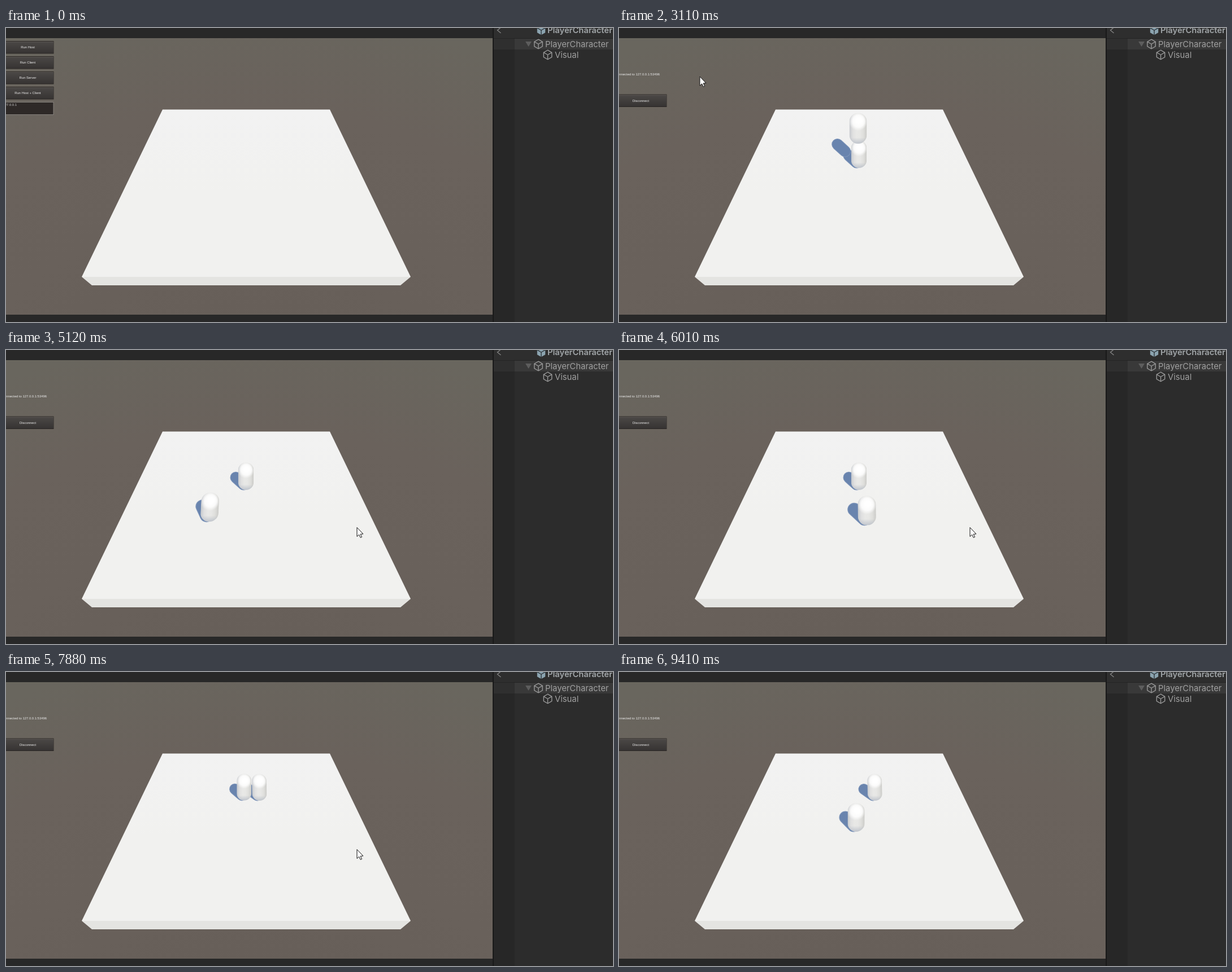
An HTML page with a canvas that plays this animation: 1074x521 px, repeating every 9580 ms.

```html
<!DOCTYPE html>
<html lang="en">
<head>
<meta charset="utf-8">
<title>Networked capsules</title>
<style>
  html, body { margin: 0; width: 100%; height: 100%; overflow: hidden; background: #282828; }
  canvas { display: block; }
</style>
</head>
<body>
<canvas id="stage" width="1074" height="521"></canvas>
<script>
const ctx = document.getElementById('stage').getContext('2d');
const LOOP = 9580, FIRST = 160, STEP = 81.14;
const CENTER_X = 424.5;
const SMALL = '5.9px "Liberation Sans", Arial, sans-serif';

const clamp = p => Math.min(1, Math.max(0, p));
const linear = p => p;
const smooth = p => p * p * (3 - 2 * p);

// A path starts at a point and follows legs of [start, end, x, y], resting in between.
function follow(t, [x, y], legs, ease = linear) {
  for (const [start, end, toX, toY] of legs) {
    const p = ease(clamp((t - start) / (end - start)));
    x += (toX - x) * p;
    y += (toY - y) * p;
  }
  return { x, y };
}

const cursorAt = t => follow(t, [866, 450], [
  [160, 1040, 48, 116], [1870, 1950, 45, 109], [1950, 2430, 37, 35],
  [2850, 3700, 621, 314], [8300, 8450, 621, 327], [8680, 9400, 910, 470]
], smooth);

const pushedAt = t => ({
  ...follow(t, [CENTER_X, 248], [[6320, 6900, 436, 228], [7630, 7950, 453, 228]]),
  lift: 0
});

function moverAt(t) {
  const jump = clamp((t - 4200) / 520);
  return {
    ...follow(t, [423, 248], [
      [4200, 4720, 363, 260], [4720, 5350, 357, 332], [5350, 5770, 447, 332],
      [5770, 6660, 416, 250], [6660, 7060, 401, 227], [7060, 7300, 388, 226],
      [7400, 7950, 427, 228], [7950, 8600, 429, 295],
      [8600, 9000, 397, 295], [9000, 9410, 419.5, 283]
    ]),
    lift: (1 - jump) * (43 + 150 * jump)
  };
}

function addStops(gradient, colors) {
  colors.forEach((c, i) => gradient.addColorStop(i / (colors.length - 1), c));
  return gradient;
}

const fade = (x0, y0, x1, y1, ...colors) =>
  addStops(ctx.createLinearGradient(x0, y0, x1, y1), colors);

function rect(x, y, w, h, fill) {
  ctx.fillStyle = fill;
  ctx.fillRect(x, y, w, h);
}

function trace(points, close = true) {
  ctx.beginPath();
  points.forEach(p => ctx.lineTo(...p));
  if (close) ctx.closePath();
}

function polygon(points, fill) {
  trace(points);
  ctx.fillStyle = fill;
  ctx.fill();
}

function stroke(color, width) {
  ctx.strokeStyle = color;
  ctx.lineWidth = width;
  ctx.stroke();
}

function label(text, x, y, font, fill, align = 'left') {
  ctx.font = font;
  ctx.fillStyle = fill;
  ctx.textAlign = align;
  ctx.fillText(text, x, y);
}

function scene() {
  rect(0, 0, 1074, 521, '#282828');
  const sky = ctx.createRadialGradient(430, 1000, 490, 430, 1000, 1040);
  rect(0, 18, 861, 490, addStops(sky, ['#675f59', '#69615b', '#6a625c', '#69665e']));
  polygon([[277, 144.5], [573, 144.5], [716, 441], [134, 441]],
    fade(0, 145, 0, 441, '#f2f2f2', '#f1f1ef', '#f1f1ef'));
  polygon([[134, 441], [716, 441], [698, 456], [152, 456]], '#e4e4e1');
}

function cube(x, y, filled) {
  const r = 8.3;
  const corner = i => [x + r * Math.sin(i * Math.PI / 3), y - r * Math.cos(i * Math.PI / 3)];
  const color = filled ? '#2e3438' : '#999';
  trace([0, 1, 2, 3, 4, 5].map(corner));
  if (filled) {
    ctx.fillStyle = '#8ba3af';
    ctx.fill();
  } else {
    stroke(color, 1.4);
  }
  for (const i of [1, 3, 5]) {
    trace([[x, y], corner(i)], false);
    stroke(color, 1.4);
  }
}

function hierarchy() {
  rect(861, 0, 213, 521, '#2c2c2c');
  rect(861, 0, 39, 521, '#272727');
  rect(861, 0, 2, 521, '#191919');
  rect(863, 0, 211, 18, '#2e2e2e');
  rect(863, 18, 211, 1, '#242424');
  rect(863, 19, 37, 19, '#2f2f2f');
  rect(900, 19, 174, 19, '#393939');
  trace([[875.5, -1], [869.5, 4], [875.5, 9]], false);
  stroke('#858585', 1.3);
  polygon([[919, 24], [930, 24], [924.5, 33]], '#5d5d5d');
  cube(947, 4, true);
  cube(942, 28.5);
  cube(958.5, 47.5);
  label('PlayerCharacter', 958, 9, '600 14.7px Inter, sans-serif', '#a0a5a8');
  label('PlayerCharacter', 954, 33.5, '14.8px Inter, sans-serif', '#a0a0a0');
  label('Visual', 971, 52.5, '14.8px Inter, sans-serif', '#a0a0a0');
}

const BUTTON = {
  normal: ['#4b4846', '#373433'],
  hover: ['#626060', '#4a4847'],
  pressed: ['#2d2b2a', '#393735']
};

function button(text, y, state = 'normal') {
  rect(0, y - 1, 84.5, 22.5, '#292523');
  rect(0, y, 84, 20.5, fade(0, y, 0, y + 20, ...BUTTON[state]));
  rect(0, y, 84, 1, '#5b5753');
  label(text, 38.5, y + 12, SMALL, '#f0f0f0', 'center');
}

function field(text, y, right) {
  rect(0, y, 84.5, 23, '#85817c');
  rect(0, y + 1, 83.5, 21, '#2e2927');
  label(text, right, y + 7, SMALL, '#d0d0d0', 'right');
}

function menu(t) {
  const clicked = (hover, press) => t < hover ? 'normal' : t < press ? 'hover' : 'pressed';
  if (t < 1365) {
    ['Run Host', 'Run Client', 'Run Server'].forEach((text, i) => button(text, 24 + 27 * i));
    button('Run Host + Client', 105, clicked(1000, 1280));
    field('127.0.0.1', 131, 19);
  } else if (t < 2915) {
    button('Connect', 24, clicked(2350, 2830));
    field('127.0.0.1', 50, 19);
    field('53496', 77, 10.5);
  } else {
    label('Connected to 127.0.0.1:53496', 72, 84, SMALL, '#eee', 'right');
    button('Disconnect', 118.5);
  }
}

// Things lower on the screen are nearer, so they grow.
const widthAt = y => 26 + (y - 228) * 0.075;
const heightAt = y => 47.5 + (y - 228) * 0.06;

function shadow({ x, y, lift }) {
  const s = widthAt(y) / 27, depth = s ** 1.5;
  const footX = x - lift * 0.44, footY = y - lift * 0.46;
  const tipX = footX - s * (17.5 + (x - CENTER_X) * 0.11);
  trace([[tipX, footY - 21.5 * depth], [footX - 4 * s, footY - 9.5 * s]], false);
  ctx.lineCap = 'round';
  stroke('#7f96ba', 20 * s);
  stroke('#6984ae', 18 * s);
  ctx.lineCap = 'butt';
}

function capsule({ x, y, lift }) {
  const near = 1 + lift * 0.0028;
  const w = widthAt(y) * near, h = heightAt(y) * near, r = w / 2;
  ctx.save();
  ctx.translate(x, y - lift);
  ctx.transform(1, 0, (CENTER_X - x) * -0.0008, 1, 0, 0);
  ctx.beginPath();
  ctx.roundRect(-r, -h, w, h, r);
  ctx.clip();
  rect(-r, -h, w, h, fade(-r, 0, r, 0, '#c6c9cd', '#e0e0e0', '#e8e8e6', '#e7e7e5', '#dfdfdc', '#cbcbc8'));
  rect(-r, -r * 0.7, w, r * 0.7, fade(0, -r * 0.7, 0, 0, 'rgba(165,173,187,0)', 'rgba(165,173,187,.6)'));
  const glow = ctx.createRadialGradient(r * 0.1, -h + r * 0.9, r * 0.3, 0, -h + r, r * 1.05);
  rect(-r, -h, w, r * 2.1, addStops(glow, ['#fff', 'rgba(255,255,255,.85)', 'rgba(255,255,255,0)']));
  ctx.restore();
}

function cursor({ x, y }) {
  const shape = [[0, 0], [0, 16], [3.7, 12.7], [6.2, 18], [8.6, 17], [6.2, 11.8], [11, 11.5]];
  polygon(shape.map(([dx, dy]) => [x + dx, y + 0.5 + dy]), '#fff');
  stroke('#111', 1);
}

function draw(now) {
  const t = FIRST + Math.floor((now % LOOP - FIRST) / STEP + 0.2) * STEP;
  scene();
  if (t >= 2990) {
    const players = [pushedAt(t), moverAt(t)].sort((a, b) => a.y - b.y);
    players.forEach(shadow);
    players.forEach(capsule);
  }
  menu(t);
  hierarchy();
  if (t >= FIRST && t < 9400) cursor(cursorAt(t));
  requestAnimationFrame(draw);
}

requestAnimationFrame(draw);
</script>
</body>
</html>
```
